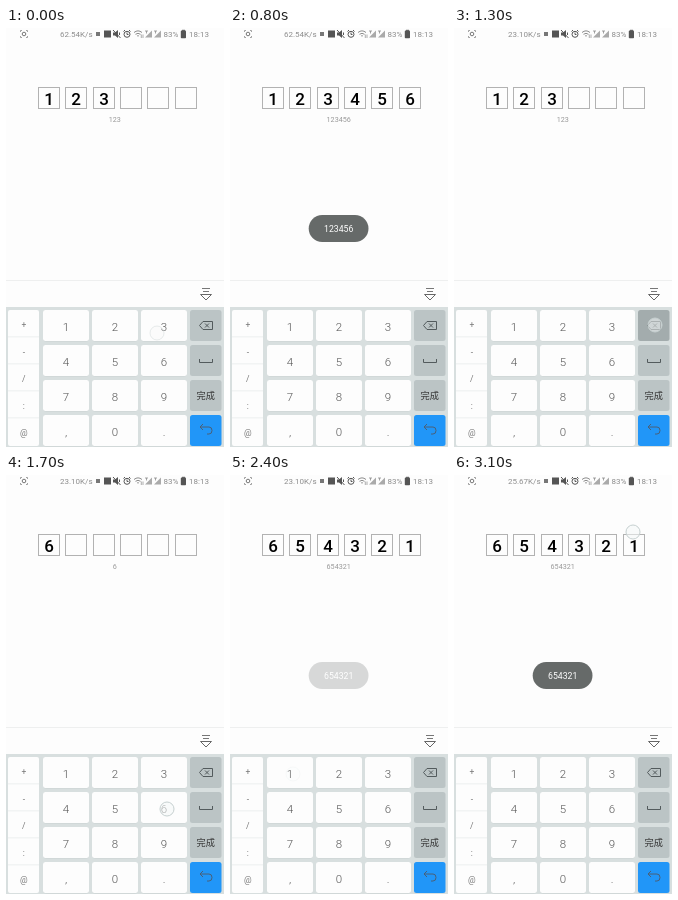
These frames come from a looping animation (218 px wide and 419 px high, 3200 ms). An HTML page with a canvas:

```html
<!DOCTYPE html>
<html lang="en">
<head>
<meta charset="utf-8">
<title>Code entry</title>
<style>
html, body { margin: 0; width: 100%; height: 100%; overflow: hidden; background: #fdfdfd; }
canvas { display: block; width: 218px; height: 419px; }
</style>
</head>
<body>
<canvas id="stage"></canvas>
<script>
const W = 218, H = 419, LOOP = 3200, STEP = 100;
const SANS = 'Roboto, "Liberation Sans", sans-serif';
const CJK = '"Noto Sans CJK SC", "Noto Sans CJK", sans-serif';
const canvas = document.getElementById('stage');
const c = canvas.getContext('2d');
const dpr = window.devicePixelRatio || 1;
canvas.width = W * dpr;
canvas.height = H * dpr;
c.scale(dpr, dpr);

// Typing runs at `rate` digits per step, counted from step `zero`;
// dx, dy is where the finger lands relative to a key's centre.
const first = { code: '123456', zero: -5.67, rate: 0.6, dx: -7, dy: 7 };
const second = { code: '654321', zero: 15.75, rate: 0.8, dx: 3, dy: 1 };
const ERASE = 11, ERASE_STEPS = 4, PRESS = 10, LAST_TAP = 28;

const clamp = (v, lo = 0, hi = 1) => Math.min(hi, Math.max(lo, v));
const keyX = col => 37 + col * 49;
const keyY = row => 282 + row * 35;

// Everything that changes, as a function of the step
function stateAt(n) {
  const run = n <= ERASE + ERASE_STEPS ? first : second;
  const typed = run.rate * (n - run.zero);
  const left = run === first ? Math.ceil(6 * (1 - (n - ERASE) / ERASE_STEPS)) : 6;
  const done = Math.ceil(run.zero + 6 / run.rate);
  const fadeIn = n < done ? 0 : 0.25 + 0.55 * (n - done);
  const fadeOut = run === first ? 0.9 - 0.5 * (n - ERASE) : 1;
  return {
    code: run.code.slice(0, clamp(Math.min(Math.floor(typed), left), 0, 6)),
    message: run.code,
    toast: clamp(Math.min(fadeIn, fadeOut)),
    speed: n < PRESS ? '62.54K/s' : n < 25 ? '23.10K/s' : '25.67K/s',
    pressed: n >= PRESS && n < ERASE + ERASE_STEPS,
    dot: dotAt(n, run, typed)
  };
}

function dotAt(n, run, typed) {
  if (n > LAST_TAP) return { x: 179, y: 57, alpha: (n - LAST_TAP) / 3 };
  if (n >= PRESS && n < ERASE + ERASE_STEPS) return { x: 201, y: 297, alpha: 1 };
  const k = clamp(Math.round(typed), 1, 6), key = run.code[k - 1] - 1;
  return {
    x: keyX(key % 3) + 23 + run.dx,
    y: keyY(Math.floor(key / 3)) + 16 + run.dy,
    alpha: clamp(1 - 1.5 * Math.abs(typed - k))
  };
}

function rect(x, y, w, h, color) {
  c.fillStyle = color;
  c.fillRect(x, y, w, h);
}

function round(x, y, w, h, r, color) {
  c.beginPath();
  c.roundRect(x, y, w, h, r);
  c.fillStyle = color;
  c.fill();
}

function text(s, x, y, font, color, align = 'center') {
  c.font = font;
  c.fillStyle = color;
  c.textAlign = align;
  c.fillText(s, x, y);
}

function line(d, color, width = 1) {
  c.lineWidth = width;
  c.strokeStyle = color;
  c.stroke(new Path2D(d));
}

function solid(d, color) {
  c.fillStyle = color;
  c.fill(new Path2D(d));
}

function ring(x, y, r, color) {
  c.beginPath();
  c.arc(x, y, r, 0, Math.PI * 2);
  c.lineWidth = 1;
  c.strokeStyle = color;
  c.stroke();
}

function statusBar(speed) {
  const gray = '#8c8c8c', dark = '#555', font = '8px ' + SANS;
  line('M14.5 4V2.5H16 M20 2.5H21.5V4 M14.5 8V9.5H16 M20 9.5H21.5V8', gray, 0.8);
  ring(18, 6, 1.8, '#777');
  text(speed, 54, 9, font, gray, 'left');
  rect(90, 4, 4, 4, '#777');
  rect(98, 2.5, 7, 7, dark);
  solid('M107 4.5H109L112 2V10L109 7.5H107Z', dark);
  line('M107 2L114.5 10 M113.5 4.5V7', dark);
  ring(121, 6.3, 3, dark);
  line('M121 4.5V6.5H122.5 M117.5 3.5L119 2 M123 2L124.5 3.5', dark);
  line('M128 4.5Q132 1.2 136 4.5 M129.5 6.3Q132 4.3 134.5 6.3', gray);
  solid('M131 7.2H133L132 9Z', gray);
  line('M135.3 6.5V10 M137 6.5V10', gray, 0.7);
  for (const x of [139, 148]) {
    solid(`M${x} 9.5L${x + 7} 2.5V9.5Z`, '#aaa');
    line(`M${x} 3H${x + 3} M${x + 1.5} 3V5.5`, gray, 0.8);
  }
  text('83%', 157.5, 9, font, gray, 'left');
  rect(176, 1.8, 3, 1, dark);
  round(174.8, 2.6, 5.2, 7.6, 0.8, dark);
  text('18:13', 183, 9, font, gray, 'left');
}

function codeBoxes(code) {
  c.lineWidth = 1;
  c.strokeStyle = '#b2b2b2';
  for (let i = 0; i < 6; i++) {
    const x = Math.floor(32.5 + i * 27.3);
    c.strokeRect(x + 0.5, 59.5, 21, 21);
    if (code[i]) text(code[i], x + 11, 77, '500 17px ' + SANS, '#000');
  }
  text(code, 108.7, 94.3, '7.2px ' + SANS, '#999');
}

function toast(message, alpha) {
  if (!alpha) return;
  c.globalAlpha = alpha;
  round(78.7, 187, 59.8, 27, 13.5, '#666a69');
  c.globalAlpha = 1;
  text(message, 108.7, 204, '8.7px ' + SANS, '#fff');
}

function keyboard(pressed) {
  rect(0, 252, W, 1, '#eeefef');
  line('M196 260.5H204 M197 263.5H203', '#777');
  line('M194.5 266.5H205.5L200 272Z', '#666');
  rect(0, 279, W, H - 279, '#d8dfdf');

  round(2, 282, 31, 136, 2, '#fdfdfd');
  [...'+-/:@'].forEach((s, i) => {
    text(s, 17.8, 300 + i * 27, '8.5px ' + SANS, '#777');
    if (i) rect(2, 281.5 + i * 27, 31, 0.8, '#e8ebeb');
  });

  [...'123456789,0.'].forEach((s, i) => {
    const x = keyX(i % 3), y = keyY(Math.floor(i / 3));
    round(x, y + 0.6, 46, 31, 2.5, '#cbd2d2');
    round(x, y, 46, 31, 2.5, '#fdfdfd');
    text(s, x + 23, y + 21, '300 11.5px ' + SANS, '#555');
  });

  for (let row = 0; row < 4; row++) {
    const color = row === 3 ? '#2196f8' : row === 0 && pressed ? '#a3acad' : '#bbc4c5';
    round(184, keyY(row), 31.5, 31, 2.5, color);
  }
  const ink = '#535b5d';
  line('M193.5 297.5L197 293.5H206.5V301.5H197Z M199 295.5L203 299.5 M203 295.5L199 299.5', ink);
  line('M193.5 331V334.5H206.5V331', ink);
  text('完成', 199.7, 371, '9.2px ' + CJK, '#333');
  line('M197 396L194 399L197 402 M194 399H203Q206 399 206 402.5T203 406H201', '#4a6078');
}

function touchDot({ x, y, alpha }) {
  c.globalAlpha = alpha;
  c.beginPath();
  c.arc(x, y, 7, 0, Math.PI * 2);
  c.fillStyle = 'rgba(244,248,248,0.55)';
  c.fill();
  ring(x, y, 7, '#c6d0d0');
  c.globalAlpha = 1;
}

function draw() {
  const s = stateAt(Math.floor((performance.now() % LOOP) / STEP));
  rect(0, 0, W, H, '#fdfdfd');
  statusBar(s.speed);
  codeBoxes(s.code);
  toast(s.message, s.toast);
  keyboard(s.pressed);
  touchDot(s.dot);
  requestAnimationFrame(draw);
}
draw();
</script>
</body>
</html>
```
